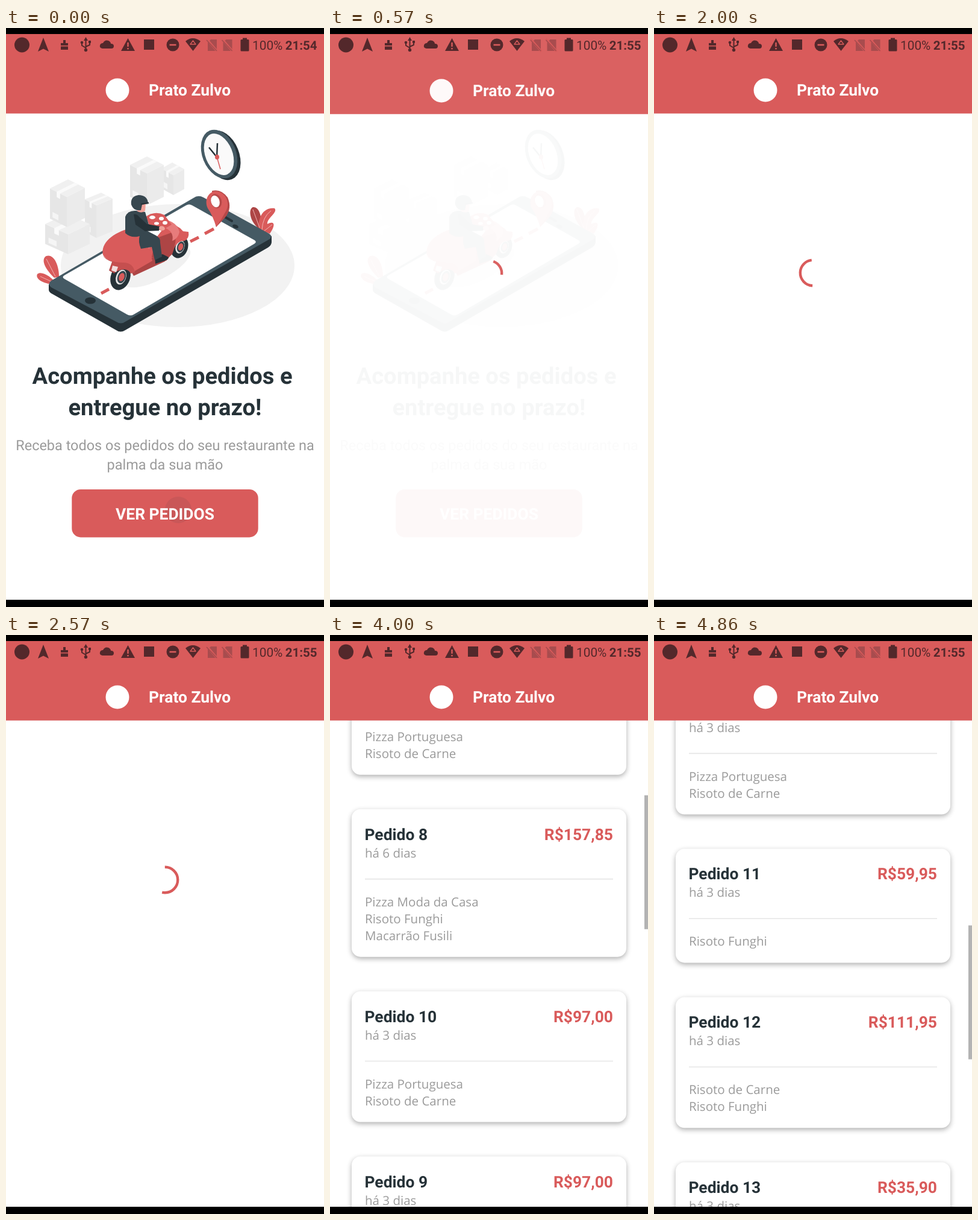
Recreate the animation shown at these times as an HTML page with a canvas. Size 528 px wide and 960 px high, loop 5010 ms.

```html
<!DOCTYPE html>
<html lang="pt-BR">
<head>
<meta charset="utf-8">
<title>Entregas</title>
<style>
  html, body { margin: 0; width: 100%; height: 100%; overflow: hidden; background: #000; }
  canvas { display: block; width: 100vw; height: 100vh; }
</style>
</head>
<body>
<canvas id="stage" width="528" height="960"></canvas>
<script>
const ctx = document.getElementById('stage').getContext('2d');
ctx.textRendering = 'geometricPrecision';
const RED = '#d95b5b', DEEP = '#ad4545', INK = '#263238', SLATE = '#455a64', NAVY = '#37474f', GRAY = '#9b9b9b';
const LOOP = 5010, STEP = 1000 / 7, LAST_STEP = 34;
const ROBOTO = 'Roboto, sans-serif', OPEN = '"Open Sans", sans-serif';

// ---------- drawing helpers ----------
function rect(fill, x, y, w, h, r = 0) {
  ctx.fillStyle = fill;
  ctx.beginPath();
  ctx.roundRect(x, y, w, h, r);
  ctx.fill();
}
function shape(fill, d) {
  ctx.fillStyle = fill;
  ctx.fill(new Path2D(d));
}
function line(color, width, d, cap = 'butt') {
  ctx.strokeStyle = color;
  ctx.lineWidth = width;
  ctx.lineCap = cap;
  ctx.lineJoin = 'round';
  ctx.stroke(new Path2D(d));
}
function oval(fill, x, y, rx, ry = rx, deg = 0) {
  ctx.fillStyle = fill;
  ctx.beginPath();
  ctx.ellipse(x, y, rx, ry, deg * Math.PI / 180, 0, 7);
  ctx.fill();
}
function text(str, x, y, font, fill, align = 'left') {
  ctx.font = font;
  ctx.fillStyle = fill;
  ctx.textAlign = align;
  ctx.fillText(str, x, y);
}

// ---------- illustration ----------
// (x, y) is the front top corner; the left and right edges recede from it.
function carton(x, y, lw, ld, rw, rd, h) {
  const at = (l, r, down = 0) => `${x - lw * l + rw * r} ${y - ld * l - rd * r + down}`;
  shape('#e6e6e6', `M${at(0, 0)}L${at(1, 0)}L${at(1, 0, h)}L${at(0, 0, h)}Z`);
  shape('#ebebeb', `M${at(0, 0)}L${at(0, 1)}L${at(0, 1, h)}L${at(0, 0, h)}Z`);
  shape('#f0f0f0', `M${at(0, 0)}L${at(1, 0)}L${at(1, 1)}L${at(0, 1)}Z`);
  shape('#fafafa', `M${at(.4, 0)}L${at(.4, 1)}L${at(.6, 1)}L${at(.6, 0)}L${at(.6, 0, 9)}L${at(.4, 0, 9)}Z`);
  shape('#f5f5f5', `M${at(.85, 0, h - 13)}L${at(.5, 0, h - 13)}L${at(.5, 0, h - 4)}L${at(.85, 0, h - 4)}Z`);
}

function drawClock() {
  oval(INK, 359, 211, 28, 43, -22);
  oval(SLATE, 354, 209, 28, 42, -22);
  oval('#fafafa', 353.5, 209.5, 22.5, 36, -22);
  line(INK, 2.5, 'M350 214L337 198M350 214L351 191');
  line(RED, 1.5, 'M349 210L356 234');
  oval(RED, 350.5, 214, 3.5, 4);
}

function drawPhone() {
  shape(INK, 'M71 425V434Q71 438 77 441L183 501Q190 506 198 501L435 364Q441 360 441 355V345Z');
  shape(SLATE, 'M75 419L311 282Q319 276 328 281L437 341Q444 346 436 351L198 487Q191 492 183 487L75 430Q68 425 75 419Z');
  shape('#fff', 'M97 410L299 294Q304 291 309 294L413 352Q417 355 412 358L212 475Q207 478 201 475L97 416Q92 413 97 410Z');
  oval(INK, 140, 452, 9, 5.5);
  line(INK, 4, 'M363 313L375 320', 'round');
  oval(INK, 381, 329, 5, 3, 20);
}

function drawWheel(x, y, rx, ry, tilt) {
  oval(INK, x, y, rx, ry, tilt);
  oval('#e5e5e5', x + 1, y, rx * .52, ry * .58, tilt);
  oval(NAVY, x + 2, y, rx * .42, ry * .48, tilt);
  oval(RED, x + 2, y, rx * .28, ry * .32, tilt);
}

function drawScooter() {
  oval('#f1f1f1', 250, 396, 62, 22, -27);
  drawWheel(288, 363, 14, 19, 18);
  shape(RED, 'M268 324Q286 326 294 337L303 338Q305 349 296 353Q282 352 276 374L266 386L232 393L238 362Z');
  shape(DEEP, 'M248 349L281 337Q284 354 276 375L263 386L242 380Z');
  shape('#e77c7c', 'M265 318Q284 322 288 338Q286 349 276 353Q280 337 261 330Z');
  drawWheel(190, 413, 16, 22, 20);
  shape(DEEP, 'M177 385L171 402L180 407Q189 392 204 397L212 411L264 387L262 379L220 383Z');
  shape(RED, 'M161 376C157 357 177 339 207 332C222 330 229 344 237 363L243 386L212 404Q207 390 196 390Q169 389 161 376Z');
  shape('#c54f4f', 'M161 377Q171 389 195 389Q211 389 214 405L207 407Q201 395 183 404L172 401L177 388Q164 384 161 377Z');
  shape('#f2dede', 'M177 394L186 396L183 405L175 402Z');
  // handlebar cover
  shape(RED, 'M232 313Q247 302 263 310L275 326L258 336L238 327Z');
  oval('#fff', 243, 314, 5, 3);
  oval('#fff', 258, 316, 4, 3);
  oval('#fff', 264, 323, 4, 3);
  oval('#fff', 250, 324, 4, 2.5);
}

function drawRider() {
  shape(INK, 'M247 379L260 375L270 380Q270 385 260 387L248 391Z');
  shape(NAVY, 'M201 337L226 332L249 344Q257 348 256 356L259 379L247 385L242 363L224 366Q219 354 222 344Z');
  shape(NAVY, 'M198 313Q202 302 216 303L231 305L237 326L227 343Q210 351 198 340Z');
  shape(INK, 'M212 309Q217 308 221 313L234 325L255 329L254 336L231 337L215 326Z');
  oval('#f0a29a', 259, 332, 5, 3.5, 15);
  shape('#f0a29a', 'M217 294L232 291L231 303Q226 308 218 304Z');
  shape(NAVY, 'M208 293Q206 279 220 277Q235 277 236 291L226 293L224 302Q212 304 208 293Z');
  line(INK, 2, 'M224 292L237 290');
}

function drawLeaves() {
  shape(RED, 'M80 414C61 396 59 382 67 378C79 374 88 392 88 413Z');
  shape(RED, 'M78 425C62 424 48 416 52 408C59 402 76 413 83 423Z');
  line('#f3b2b2', 1, 'M67 383L82 412M57 412L79 422');
  shape(DEEP, 'M420 333C404 320 402 300 410 297C421 296 425 313 424 333Z');
  shape(RED, 'M420 334C417 312 430 296 446 299C452 306 433 315 434 325C445 319 449 325 438 341Z');
  line('#f3b2b2', 1, 'M410 301L421 331M440 303Q426 313 425 335M442 326L428 337');
}

function drawPin() {
  shape('#b74949', 'M342 270Q357 266 368 281Q376 299 364 314L349 330L344 307Z');
  shape(RED, 'M349 330Q343 310 335 299C328 284 338 269 350 271C365 273 372 289 366 302Q358 317 349 330Z');
  oval('#b74949', 349, 287, 9, 12, -18);
  oval('#fff', 347.5, 287.5, 7, 10, -18);
}

function drawHome(t) {
  oval('#f2f2f2', 285, 394, 194, 102);
  carton(278, 244, 20, 11, 18, 10, 33);
  carton(234, 241, 28, 14, 28, 14, 53);
  carton(150, 294, 19, 10, 27, 11, 54);
  carton(103, 342, 38, 17, 36, 17, 33);
  carton(101, 280, 28, 14, 30, 15, 50);
  drawClock();
  drawLeaves();
  drawPhone();
  line(RED, 5, 'M158 440L171 433M306 354L320 347M330 341L345 333');
  drawPin();
  drawScooter();
  drawRider();

  const headline = '700 38.13px ' + ROBOTO, body = '23.47px ' + ROBOTO;
  text('Acompanhe os pedidos e', 259.5, 590, headline, INK, 'center');
  text('entregue no prazo!', 264, 641.5, headline, INK, 'center');
  text('Receba todos os pedidos do seu restaurante na', 264, 700, body, GRAY, 'center');
  text('palma da sua mão', 264, 732, body, GRAY, 'center');

  rect(RED, 109.3, 765, 309.4, 79.4, 14.67);
  ctx.save();
  ctx.clip();
  oval('rgba(38,50,56,.09)', 286, 799, 22 + t * .6);
  ctx.restore();
  text('VER PEDIDOS', 264, 815, '700 26.4px ' + ROBOTO, '#fff', 'center');
}

// ---------- loading and order list ----------
function ease(x) {
  // cubic-bezier(.4, 0, .2, 1)
  let lo = 0, hi = 1, u = .5;
  for (let i = 0; i < 20; i++) {
    u = (lo + hi) / 2;
    const bx = 1.2 * u * (1 - u) ** 2 + .6 * u * u * (1 - u) + u ** 3;
    if (bx < x) lo = u; else hi = u;
  }
  return 3 * u * u - 2 * u ** 3;
}

function drawSpinner(t) {
  const phase = Math.max(0, t - 393) / 1333 % 1;
  const head = .75 * ease(Math.min(1, phase * 2));
  const tail = .75 * ease(Math.max(0, phase * 2 - 1));
  const turn = phase * .25 + (8 + (t - 571) * .109) / 360 - .25;
  ctx.strokeStyle = RED;
  ctx.lineWidth = 4.4;
  ctx.lineCap = 'butt';
  ctx.beginPath();
  ctx.arc(264, 406, 21.2, (tail + turn) * 2 * Math.PI, (Math.max(head, tail + .02) + turn) * 2 * Math.PI);
  ctx.stroke();
}

const PORTUGUESA = ['Pizza Portuguesa', 'Risoto de Carne'];
const orders = [
  [6, 10, '109,85', ['Pizza Bacon', 'Risoto Funghi']],
  [3, 10, '97,00', PORTUGUESA],
  [8, 6, '157,85', ['Pizza Moda da Casa', 'Risoto Funghi', 'Macarrão Fusili']],
  [10, 3, '97,00', PORTUGUESA],
  [9, 3, '97,00', PORTUGUESA],
  [11, 3, '59,95', ['Risoto Funghi']],
  [12, 3, '111,95', ['Risoto de Carne', 'Risoto Funghi']],
  [13, 3, '35,90', ['Risoto Funghi']]
];

function drawOrders(scroll) {
  const bold = '700 26.4px ' + ROBOTO, regular = '20.53px ' + OPEN, lineHeight = 27.95;
  let y = 190 - scroll;
  for (const [id, days, price, items] of orders) {
    const height = 161 + items.length * lineHeight;
    ctx.save();
    ctx.shadowColor = 'rgba(0,0,0,.32)';
    ctx.shadowBlur = 8;
    ctx.shadowOffsetY = 3;
    rect('#fff', 36, y, 456, height, 14.67);
    ctx.restore();
    text('Pedido ' + id, 57.5, y + 51, bold, INK);
    text('R$' + price, 470, y + 51, bold, RED, 'right');
    text(`há ${days} dias`, 58, y + 80, regular, GRAY);
    rect('#e6e6e6', 58, y + 115, 412, 1.6);
    items.forEach((item, i) => text(item, 58, y + 161 + i * lineHeight, regular, GRAY));
    y += height + 57;
  }
  if (scroll) rect('#b3b3b3', 522, 142 + scroll * .2754, 6, 222);
}

function drawHeader() {
  rect(RED, 0, 10, 528, 131.7);
  oval('#fff', 185, 103, 19.5);
  text('Prato Zulvo', 237, 112, '700 26.4px ' + ROBOTO, '#fff');
}

function drawStatusBar(clock) {
  const dark = '#53282b', faint = '#a84c4e';
  oval(dark, 26.5, 28, 12.5);
  shape(dark, 'M62 16L71 39L62 34.5L53 39Z');
  shape(dark, 'M95 20H99V25H103V29H91V25H95ZM91 30.5H103V36H91Z');
  line(dark, 2, 'M132.5 20V36M126 24V29L132.5 33M139 23V28L132.5 31');
  shape(dark, 'M132.5 15L136 21H129Z');
  oval(dark, 132.5, 36.5, 2.7);
  oval(dark, 126, 24, 2.3);
  rect(dark, 137, 21, 4, 4);
  shape(dark, 'M160 34Q155 33 156 28.5Q157 25 161 25Q164 19 170 21Q174 23 174 26Q179 26 179 30Q179 34 175 34Z');
  shape(dark, 'M202.5 17L214 38H191Z');
  rect(RED, 201.3, 24, 2.4, 7);
  rect(RED, 201.3, 33, 2.4, 2.4);
  rect(dark, 229, 19, 17, 17);
  oval(dark, 277, 28, 10.5);
  rect(RED, 271.5, 26.7, 11, 2.6);
  shape(dark, 'M298 22Q310 12 323 22L310.5 38Z');
  line(RED, 1.3, 'M310.5 21L315 27H306Z');
  for (const x of [333, 358.5]) {
    shape(faint, `M${x + 7} 19H${x + 17}V38H${x + 2}V24Z`);
    line(RED, 3.5, `M${x} 18L${x + 18} 39`);
    line(faint, 1.7, `M${x} 20L${x + 17} 38`);
  }
  rect(dark, 389.5, 19, 14, 19.5, 1.5);
  rect(dark, 393, 16.5, 7, 4);
  text('100%', 409, 36, '20.8px ' + ROBOTO, dark);
  text(clock, 516.5, 36, '700 20.5px ' + ROBOTO, dark, 'right');
}

// ---------- timeline ----------
function scrollAt(step) {
  if (step < 28) return 0;
  if (step < 29) return 449;
  if (step < 32) return 560;
  return [785, 1080, 1233][step - 32];
}

function drawScreen(step) {
  const t = step * STEP;
  const entry = Math.min(1, Math.max(0, (t - 367) / 350));
  const progress = 1 - (1 - entry) ** 5;
  ctx.globalAlpha = 1;
  rect('#fff', 0, 0, 528, 960);

  if (progress < 1) {
    drawHome(t);
    drawHeader();
  }
  if (progress > 0) {
    ctx.save();
    // The entering screen rises while each of its layers fades in.
    ctx.globalAlpha = progress < .5 ? progress / 2
      : progress < .9 ? .25 + (progress - .5) * 1.125
      : .7 + (progress - .9) * 3;
    ctx.translate(0, 75 * (1 - progress));
    rect('#fff', 0, 10, 528, 950);
    if (step < 21) drawSpinner(t); else drawOrders(scrollAt(step));
    drawHeader();
    ctx.restore();
  }
  drawStatusBar(step < 3 ? '21:54' : '21:55');
  rect('#000', 0, 0, 528, 10);
  rect('#000', 0, 948, 528, 12);
}

const started = performance.now();
function tick() {
  const t = (performance.now() - started) % LOOP;
  drawScreen(Math.min(LAST_STEP, Math.floor((t + 4) / STEP)));
  requestAnimationFrame(tick);
}
tick();
</script>
</body>
</html>
```
